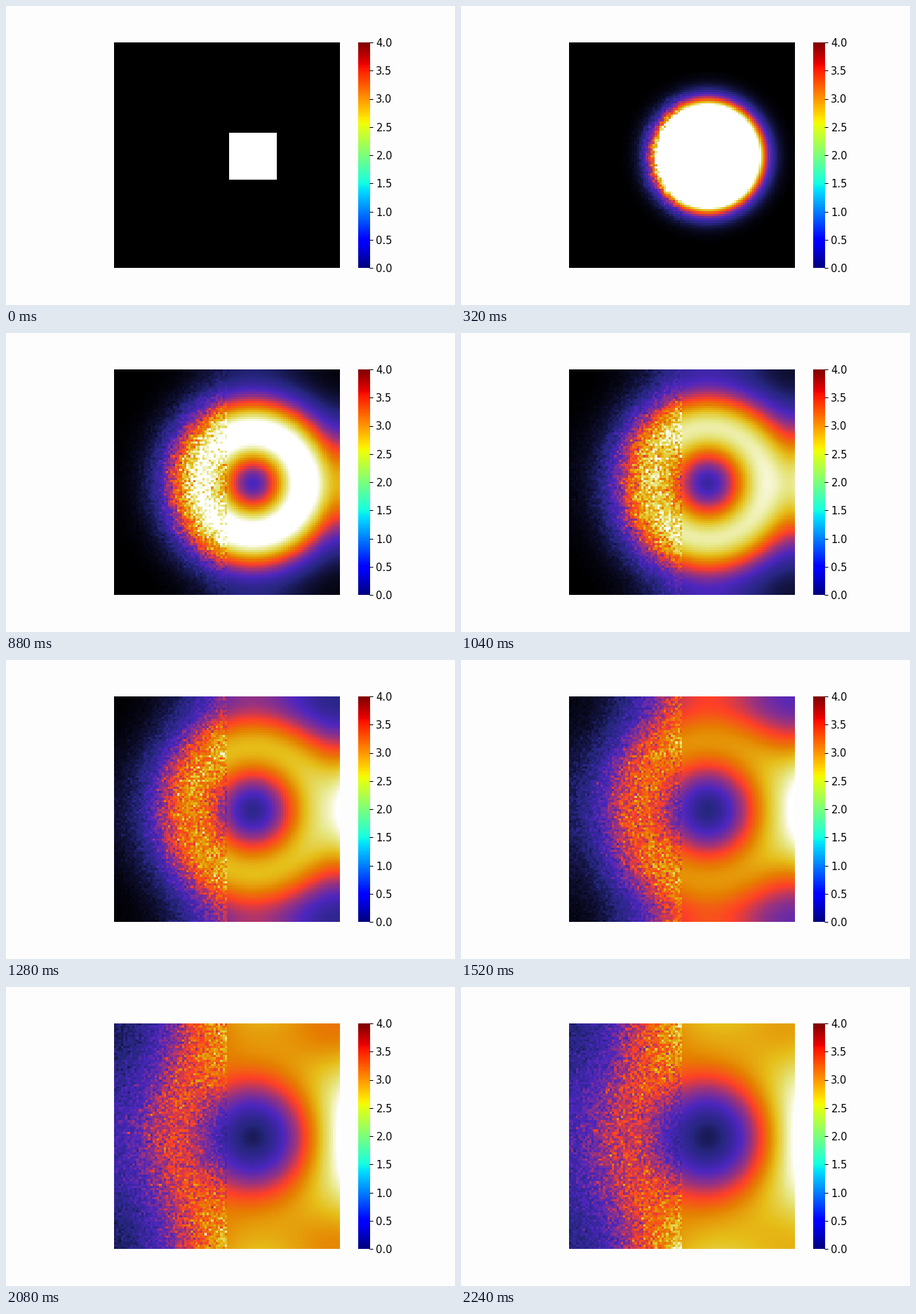
Write a matplotlib script that moves like this. It is 640 px wide and 427 px high and loops after 2320 ms.

```python
import math

import numpy as np
import matplotlib.pyplot as plt
from matplotlib.animation import FuncAnimation

W, H, DPI = 640, 427, 96
FRAMES, STEP = 29, 80
N, SIZE = 100, 322
CELL = SIZE / N
CX, CY, HALF = 61.5 * CELL, 50.5 * CELL, 10.5 * CELL
WALL = N // 2

pos = (np.arange(N) + 0.5) * CELL
dx, dy = np.meshgrid(pos - CX, pos - CY)
dist = np.hypot(dx, dy)
depth = WALL * CELL - pos[:WALL]


def spread(center, var):
    """Diffused bump along one axis, mirrored at both walls."""
    return sum(np.exp(-((pos - c) ** 2) / (2 * var))
               for c in (center, -center, 2 * SIZE - center))


def field(i):
    if i == 0:
        return np.where(np.maximum(abs(dx), abs(dy)) < HALF, 1.0, 0.0)
    t = i * STEP
    var = 2.6 * t + 0.00072 * t * t
    mass = 15000 + 6000 * math.exp(-t / 800)
    u = mass / var * np.outer(spread(CY, var), spread(CX, var))

    # decay that hollows out the middle
    width = 31 * math.tanh(t / 1100)
    drop = 3.4 * math.tanh(t / 350) - t / 5000
    u /= 1 + np.exp(drop - (np.sqrt(dist**2 + 100) - 10) / width)

    # weaker, grainy medium in the left half
    rng = np.random.default_rng(100 + i)
    ramp = min(1, t / 1200)
    gain = (1.2 - 0.0037 * depth) * (1 - 0.3 * np.exp(-((dist[:, :WALL] / 110) ** 2)))
    grain = (0.12 + 0.08 * depth / depth.max()) * rng.standard_normal((N, WALL))
    u[:, :WALL] *= (1 + ramp * (gain - 1)) * np.exp(grain)
    return np.clip(u, 0, 1)


def add_axes(x, y, w, h):
    return fig.add_axes([x / W, 1 - (y + h) / H, w / W, h / H])


plt.rcParams["font.family"] = "DejaVu Sans"
fig = plt.figure(figsize=(W / DPI, H / DPI), dpi=DPI, facecolor="#fdfdfd")

ax = add_axes(154, 52, SIZE, SIZE)
ax.axis("off")
img = ax.imshow(field(0), cmap="CMRmap", vmin=0, vmax=1,
                aspect="auto", interpolation="nearest")

bar = add_axes(502, 52, SIZE / 20, SIZE)
bar.imshow(np.linspace(0, 4, 256)[:, None], cmap="jet", aspect="auto",
           origin="lower", extent=(0, 1, 0, 4))
bar.set_xticks([])
bar.yaxis.tick_right()
ticks = np.arange(0, 4.1, 0.5)
bar.set_yticks(ticks, [f"{v:.1f}" for v in ticks])
bar.tick_params(labelsize=11)
for side in bar.spines.values():
    side.set_visible(False)


def update(i):
    img.set_data(field(i))
    return [img]


anim = FuncAnimation(fig, update, frames=FRAMES, interval=STEP,
                     repeat=True, repeat_delay=0)
plt.show()
```
